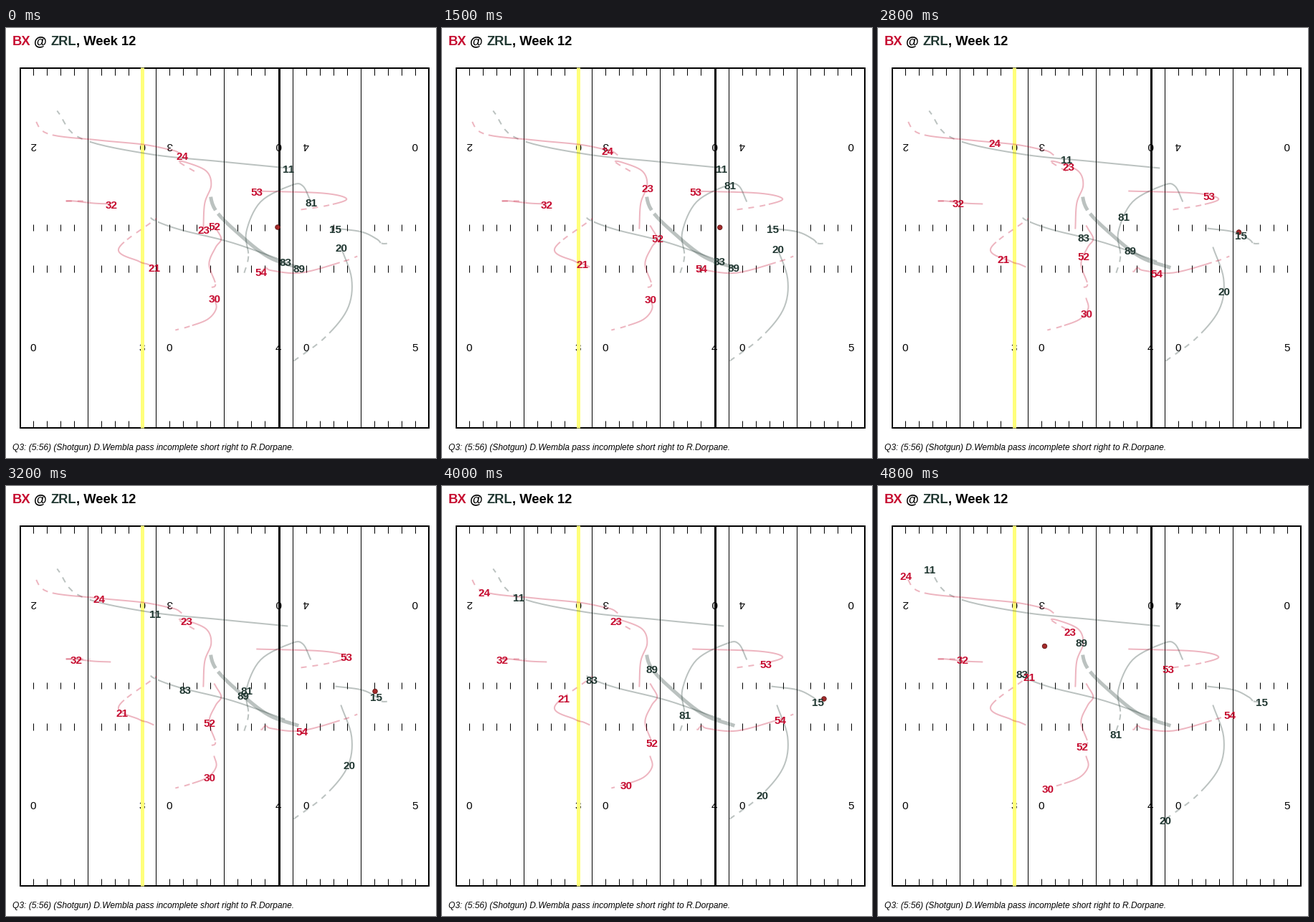
Recreate the animation shown at these times as a matplotlib script. Size 600 by 600 pixels, loop 5.9 s.

```python
import numpy as np
import matplotlib.pyplot as plt
from matplotlib.animation import FuncAnimation
from matplotlib.patches import Circle, Rectangle

DPI = 100
SIZE = 600
STEP = 100       # ms per frame
FRAMES = 59
LAST = 48        # players stand still from here on
THROW = 40       # routes are dashed from here on
START = 12.5     # players set off
RAMP = 10        # frames needed to reach full speed
RED, DARK = "#C60C30", "#203731"

plt.rcParams["font.family"] = "Liberation Sans"
fig = plt.figure(figsize=(SIZE / DPI, SIZE / DPI), dpi=DPI, facecolor="white")
ax = fig.add_axes([0, 0, 1, 1])
ax.set_xlim(0, SIZE)
ax.set_ylim(SIZE, 0)
ax.axis("off")


def pt(px):
    return px * 72 / DPI


def vline(x, y0, y1, width=1, color="black", z=1):
    ax.plot([x, x], [y0, y1], color=color, lw=pt(width), zorder=z,
            solid_capstyle="butt")


def label(x, y, s, size=11, z=2, **kw):
    return ax.text(x, y, s, fontsize=size, zorder=z, va="baseline", **kw)


def draw_field():
    left, right, top, bottom = 19.45, 590, 56, 558
    yard = 19.03
    for n in range(1, 30):
        x = int(left + n * yard)
        if n % 5 == 0:
            vline(x, top, bottom)
            continue
        for y in (top, 273.5, 331, bottom - 10):
            vline(x, y, y + 9.5)
    ax.add_patch(Rectangle((20, top), right - 20, bottom - top, fill=False,
                           ec="black", lw=pt(2), zorder=1))
    # the digits of 20, 30, 40 and 50 stand one yard either side of their line
    spots = [left + yard * n for n in (1, 9, 11, 19, 21, 29)]
    for x, upper, lower in zip(spots, "203040", "030405"):
        label(x - 0.9, 160, upper, ha="center", rotation=180,
              rotation_mode="anchor")
        label(x - 0.9, 451, lower, ha="center")
    vline(190, 55, 558, 5, "#FFFF7A", 3)
    vline(381, 56, 558, 3, "black", 3)


def draw_captions():
    for x, s, c in ((8.7, "BX", RED), (39.3, "@", "black"),
                    (62.2, "ZRL", DARK), (97.9, ", Week 12", "black")):
        label(x, 24, s, 13.2, color=c, weight="bold")
    label(9, 589, "Q3: (5:56) (Shotgun) D.Wembla pass incomplete short right "
          "to R.Dorpane.", 8.68, style="italic")


def progress(early):
    """Share of the route covered at each frame."""
    t = np.arange(LAST + 1.0)
    if early:
        return t / LAST
    t = np.maximum(t - START, 0)
    run = np.where(t < RAMP, t * t / (2 * RAMP), t - RAMP / 2)
    return run / run[-1]


def spline(points, share):
    """Catmull-Rom curve through evenly timed points."""
    p = np.array(points, float)
    p = np.vstack([2 * p[0] - p[1], p, 2 * p[-1] - p[-2]])
    u = share * (len(points) - 1)
    k = np.minimum(u.astype(int), len(points) - 2)
    s = (u - k)[:, None]
    a, b, c, d = (p[k + j] for j in range(4))
    return b + s / 2 * (c - a + s * (2 * a - 5 * b + 4 * c - d
                                     + s * (3 * (b - c) + d - a)))


players = []


def player(number, color, *points, early=False, width=2):
    pos = spline(points, progress(early))
    x, y = (pos - (0.7, 1.5)).T
    style = dict(color=color, alpha=0.3, lw=pt(width), zorder=4,
                 solid_capstyle="butt", dash_capstyle="butt",
                 solid_joinstyle="round", dash_joinstyle="round")
    ax.plot(x[:THROW], y[:THROW], **style)
    ax.plot(x[THROW:], y[THROW:], ls=(0, (4, 4)), **style)
    text = label(0, 0, number, z=6 if color == DARK else 7, color=color,
                 weight="bold", ha="center")
    players.append((text, pos))


draw_field()
draw_captions()

# off with the snap
player("11", DARK, (394, 197), (302, 188), (198, 177), (104, 155), (72, 117))
player("15", DARK, (460, 281), (497, 286), (518, 296), (525, 302), (536, 302))
player("20", DARK, (468, 307), (483, 352), (477, 394), (445, 434), (401, 467))
player("83", DARK, (390, 327), (316, 301), (244, 283), (208, 270), (201, 263))
player("89", DARK, (409, 336), (367, 321), (327, 290), (292, 254), (284, 219),
       width=5)
player("30", RED, (291, 378), (294, 393), (282, 408), (256, 418), (237, 423))
player("32", RED, (147, 247), (123, 246), (96, 243), (85, 243), (118, 243))
player("53", RED, (350, 229), (443, 232), (476, 240), (450, 249), (405, 256))

# already moving before it
player("21", RED, (207, 335), (198, 331), (186, 327), (158, 309), (211, 267),
       early=True)
player("23", RED, (276, 282), (278, 246), (287, 221), (280, 201), (252, 189),
       (243, 189), (268, 204), early=True)
player("24", RED, (246, 179), (239, 174), (228, 171), (192, 164), (130, 158),
       (59, 149), (39, 126), early=True)
player("52", RED, (291, 277), (294, 282), (301, 296), (293, 308), (284, 331),
       (293, 359), (285, 364), early=True)
player("54", RED, (356, 341), (358, 341), (363, 336), (372, 340), (413, 343),
       (472, 327), (491, 320), early=True)
player("81", DARK, (426, 244), (415, 222), (399, 221), (356, 244), (336, 286),
       (339, 320), (332, 347), early=True)

ball = ax.add_patch(Circle((0, 0), 3.2, fc="#A52A2A", ec="#6B1A1A", lw=pt(1),
                           zorder=5))


def ball_at(i):
    """Snapped, carried back, then thrown."""
    times = (14.7, 18, 32, THROW, LAST)
    return (np.interp(i, times, (379, 475, 515, 533, 232.5)),
            np.interp(i, times, (278, 281, 286.5, 297, 223.5)))


def update(i):
    i = min(i, LAST)
    for text, pos in players:
        text.set_position((pos[i, 0], pos[i, 1] + 5))
    ball.center = ball_at(i)
    return [ball] + [text for text, _ in players]


anim = FuncAnimation(fig, update, frames=FRAMES, interval=STEP, repeat=True,
                     repeat_delay=0, init_func=lambda: update(0))
plt.show()
```
